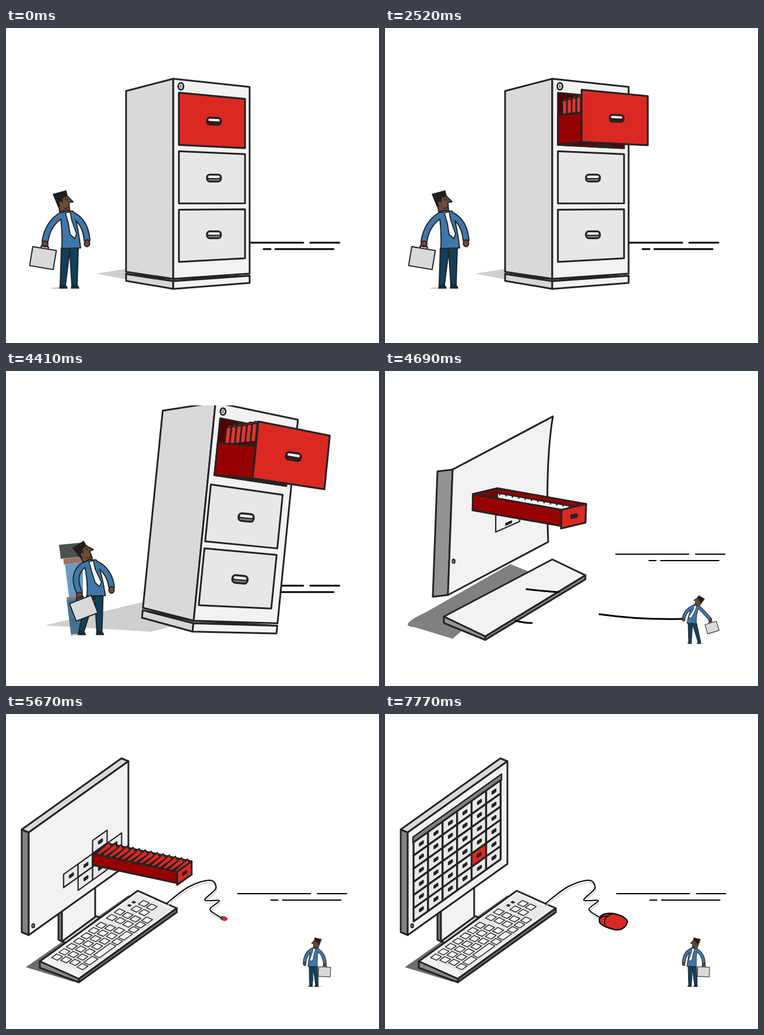
An HTML page for the animation above (7840 ms loop, 640 by 540 pixels).

```html
<!DOCTYPE html>
<html lang="en">
<head>
<meta charset="utf-8">
<title>Filing cabinet to computer</title>
<style>
html, body { margin: 0; width: 100%; height: 100%; overflow: hidden; background: #fff; }
svg { display: block; width: 100vw; height: 100vh; }
</style>
</head>
<body>
<svg id="stage" viewBox="0 0 640 540" stroke-linejoin="round" stroke-linecap="round"></svg>
<script>
const LOOP = 7840, STEP = 70;
const TIP = 3430, DROP = 4410, LAND = 4690, STILL = 5110;
const INK = '#242424', RED = '#dc2823', DEEP = '#960000', SKIN = '#6f4a37', BLUE = '#3f77aa', NAVY = '#10405c';
const stage = document.getElementById('stage');

const clamp = v => Math.max(0, Math.min(1, v));
const span = (t, a, b) => clamp((t - a) / (b - a));
const smooth = k => k * k * (3 - 2 * k);
const lerp = (a, b, k) => a + (b - a) * k;
const mix = (a, b, k) => a.map((v, i) => lerp(v, b[i], k));
const spring = (s, damp, freq) => s > 0 ? 1 - Math.exp(-damp * s) * Math.cos(freq * s) : 0;
const grey = v => `rgb(${[v, v, v].map(Math.round)})`;

function keyed(t, keys) {
  if (t <= keys[0][0]) return keys[0][1];
  for (let i = 1; i < keys.length; i++) {
    const [t0, a] = keys[i - 1], [t1, b] = keys[i];
    if (t < t1) return mix(a, b, smooth(span(t, t0, t1)));
  }
  return keys[keys.length - 1][1];
}

// ---------- geometry: points are [x, y], quads are four points in a flat list ----------
const add = (...pts) => pts.reduce(([x, y], [a, b]) => [x + a, y + b]);
const times = ([x, y], k) => [x * k, y * k];
const para = (o, a, b) => [...o, ...add(o, a), ...add(o, a, b), ...add(o, b)];
const shift = (q, dx, dy) => q.map((v, i) => v + (i % 2 ? dy : dx));
const corner = (q, i) => q.slice(i * 2, i * 2 + 2);
const inQuad = (q, u, v) =>
  mix(mix(corner(q, 0), corner(q, 1), u), mix(corner(q, 3), corner(q, 2), u), v);
const patch = (q, u0, v0, u1, v1) =>
  [[u0, v0], [u1, v0], [u1, v1], [u0, v1]].flatMap(([u, v]) => inQuad(q, u, v));
const centred = (q, u, v, w, h) => patch(q, u - w / 2, v - h / 2, u + w / 2, v + h / 2);

// ---------- drawing ----------
const path = (d, fill, w = 3, stroke = INK) =>
  `<path d="${d}" fill="${fill}" stroke="${w ? stroke : 'none'}" stroke-width="${w}"/>`;
const poly = (p, fill, w) => path('M' + p.map(v => v.toFixed(2)).join(' ') + 'Z', fill, w);
const group = (transform, body) => `<g transform="${transform}">${body}</g>`;
const oval = (x, y, rx, ry, fill, w = 0) =>
  `<ellipse cx="${x}" cy="${y}" rx="${rx}" ry="${ry}" fill="${fill}" stroke="${INK}" stroke-width="${w}"/>`;
const box = (x, y, w, h, r, fill, sw = 0) =>
  `<rect x="${x}" y="${y}" width="${w}" height="${h}" rx="${r}" fill="${fill}" stroke="${INK}" stroke-width="${sw}"/>`;

// Smooth curve through the given points.
function curve(pts) {
  const at = i => pts[Math.max(0, Math.min(pts.length - 1, i))];
  let d = 'M' + pts[0];
  for (let i = 0; i < pts.length - 1; i++) {
    const bow = (p, a, b) => add(p, times(add(b, times(a, -1)), 1 / 6));
    d += `C${bow(at(i), at(i - 1), at(i + 1))} ${bow(at(i + 1), at(i + 2), at(i))} ${at(i + 1)}`;
  }
  return d;
}

// ---------- man: lean, head turn, bag hand x, bag swing, step back ----------
const LOOK = [0, 0, 67, 9.5, 0];
const REST = [0, 2, 70, -3, 0];
const PEER = [-7, -12, 88, -10, 17];
const DODGE = [-3, -17, 82, -21, 12];
const PULL = [-7, -13, 48, 17, 12];

function man([lean, turn, hx, swing, step]) {
  const hy = Math.max(368, 371 + (hx - 69) * .4), ry = 369 + lean * .7;
  const leg = (x, f) => poly([x, 377, x + 15, 377, f + 4, 441, f - 5, 441], NAVY, 2) +
    path(`M${f - 6} 446L${f - 5} 441L${f + 3} 441Q${f + 6} 442 ${f + 7} 446Z`, '#132c3c', 1.6);
  const sleeves = `M${95 + lean} 321Q${(95 + lean + hx) / 2 - 9 - (hx - 67) * .75} ${hy / 2 + 150} ${hx} ${hy - 5}` +
    `M${115 + lean} 321Q${136 + lean / 2} 332 139 ${ry - 6}`;
  const face = poly([-11, -22, 4, -27, 15, -16, 8, -15, 9, -2, -8, 1], SKIN, 2) +
    poly([-19, -29, 3, -35, 5, -26, -3, -23, -4, -13, -10, -7], '#1e1e1e', 1.6) +
    oval(-6, -13, 2.6, 3.6, SKIN) + oval(5, -18, 1, 1, INK) + path('M1 -20L6 -21M0 -5Q4 -4 8 -7', 'none', 1.5);
  const bag = path('M-6 6V1H6V6', 'none', 2.5) + box(-20.5, 5, 41, 33, 0, '#d9d9d9', 2);
  const neck = 100 + lean;
  return oval(92 - step, 446, 15, 1.4, '#ccc') + leg(95, 98 - step) + leg(109, 118) +
    path(sleeves, 'none', 12) +
    path(`M${neck - 7} 319L${neck + 3} 313L${neck + 15} 314Q${123 + lean / 2} 335 128 377L96 378Q97 345 ${neck - 7} 319Z`, BLUE, 2) +
    path(sleeves, 'none', 8, BLUE) +
    path(`M${neck + 2} 317L${neck + 10} 315L${neck + 13} 330L121 353L118 361L110 354L${neck + 7} 335Z`, '#f7f7f7', 1.8) +
    group(`translate(${neck} ${314 - lean * .4}) rotate(${turn})`, face) +
    oval(hx, hy, 5, 5, SKIN, 2) + oval(139, ry, 4.6, 6, SKIN, 2) +
    group(`translate(${hx} ${hy + 3}) rotate(${swing})`, bag);
}

function smear(right) {
  const bands = [['#3c3c3c', 24], ['#8d6655', 10], ['#5a8fbd', 56], ['#8d6655', 4], ['#346788', 62]];
  let y = 296, out = '';
  for (const [fill, h] of bands) {
    const x = 91 + Math.min(13, (y - 296) * .3);
    out += poly([x, y + 2, right, y - 2, right, y + h - 2, x + h / 8, y + h + 2], fill, 0);
    y += h;
  }
  return `<g opacity=".9">${out}</g>`;
}

function drawMan(t) {
  const idle = mix(REST, LOOK, .45 + .55 * Math.cos(t / 2520 * 2 * Math.PI));
  const pose = t < 2520 ? idle
    : [...keyed(t, [[2520, LOOK], [3360, PEER], [4130, PEER], [DROP, DODGE], [LAND, PULL], [4900, PULL], [5180, REST]])];
  if (t > 5180) pose[1] += 1.5 * Math.sin((t - 5670) / 2100 * 2 * Math.PI);
  const [x, y, k] = keyed(t, [[3500, [109, 446, 1]], [4200, [112, 449, 1]], [DROP, [152, 452, .97]], [LAND, [527.5, 467, .5]]]);
  const flip = t >= LAND ? -1 : 1;
  return (t >= 4340 && t < 4550 ? smear(Math.min(x, 160) - 20) : '') +
    group(`translate(${x} ${y}) scale(${k * flip} ${k}) translate(-109 -446)`, man(pose));
}

// ---------- speed lines and cable ----------
function speedLines(t) {
  const [x, y, w] = keyed(t, [[DROP, [572, 368, 3]], [LAND, [583, 314, 2]], [STILL, [584.5, 308, 2]]]);
  return group(`translate(${x} ${y})`, path('M-187 0H-62M-50 0H0M-130 11H-118M-110 11H-10', 'none', w, '#000'));
}

function cable(t) {
  if (t < 4620) return '';
  if (t < 4760) return path('M243 374Q275 378 298 379M224 428Q238 432 252 432M368 417Q440 427 510 425', 'none', 3, '#000');
  const curl = [[275, 325], [314, 296], [350, 285], [360, 299], [341, 319], [366, 320], [350, 335], [369, 349]];
  const s = span(t, 4830, 5530), k = s < 1 ? spring(s, 5, 8) : 1;
  const d = curve(curl.map((p, i) => mix(mix(curl[0], [510, 425], i / 7), p, k)));
  let out = (s > .5 ? group('translate(1 4)', path(d, 'none', 1.5, '#ccc')) : '') + path(d, 'none', 2, '#000');
  if (t >= 5320) {
    const size = lerp(.25, 1, smooth(span(t, 5670, 6020)));
    out += group(`translate(368 349) scale(${size})`,
      path('M0 2C2 -6 11 -8 23 -7C35 -5 46 0 48 7C46 16 38 22 28 21C17 19 1 13 0 7Z', RED, 2.5, '#111') +
      path('M23 -7C12 -4 8 3 9 11M0 2Q6 -4 15 -2', 'none', 2, '#111'));
  }
  return out;
}

// ---------- keyboard keys ----------
function keys(t, top) {
  let out = poly(patch(top, .07, .07, .97, .93), '#e8e8e8', 0), n = 0;
  const key = (u, v, w = .052) => {
    const k = span(t, 4900 + n * 10, 5040 + n * 10);
    n++;
    if (k) out += poly(centred(top, u, v, w * k, .15 * k), '#f2f2f2', 1.4);
  };
  for (let r = 0; r < 3; r++) {
    const v = .18 + .2 * r;
    for (let c = 0; c < 7; c++) key(.105 + .075 * c + .012 * r, v);
    for (const u of r ? [.67, .745, .835, .912] : [.665, .745]) key(u, v);
  }
  let u = .087;
  for (const units of [1, 1.5, 2.7, 1, 1.5, 1, 1, 1]) {
    const w = units * .068;
    key(u + w / 2, .79, w - .016);
    u += w;
  }
  for (const u of [.84, .885]) out += poly(centred(top, u, .19, .016, .06), INK, 1);
  return out;
}

// ---------- screen cells ----------
const CW = 24.9, CH = 22.6, RISE = -.713 * CW;
const cellAt = (i, j) => [49 + CW * i, 220 + RISE * i + CH * j];
const cell = (i, j) => para(cellAt(i, j), [CW, RISE], [0, CH]);

// Cells spread from the red one, a little sooner towards the lower left.
function cells(t) {
  const bar = span(t, 6160, 6580);
  let out = bar ? poly(para([200, 103], [-152 * bar, 108 * bar], [0, 10]), '#808080', 2.4) : '';
  for (let j = 0; j < 6; j++) for (let i = 0; i < 6; i++) {
    const di = i - 4, dj = j - 4;
    if (!di && !dj) continue;
    const start = 3980 + 1210 * Math.sqrt(Math.abs(di) + Math.abs(dj) + (di - dj) / 4);
    const k = smooth(span(t, start, start + 210));
    if (!k) continue;
    const q = centred(cell(i, j), .5, .5, k, k);
    out += poly(q, '#e8e8e8', lerp(2.2, 3.3, bar)) + poly(centred(q, .54, .5, .24, .16), INK, 2.5);
  }
  return out;
}

// ---------- computer: edge vectors as it lands and at rest ----------
const LANDING = {
  screen: [116, 169], right: [172, -91], down: [-8, 215], depth: [-26, 3],
  board: [101, 421], long: [186, -98], wide: [71, 34], taper: [.2],
  slot: [151, 211], across: [42, -10], drop: [-1, 32], out: [152, 27], shade: [215, 331]
};
const RESTING = {
  screen: [39, 203], right: [171, -122], down: [0, 176], depth: [-12, -5],
  board: [58, 424], long: [168, -121], wide: [67, 30], taper: [0],
  slot: cellAt(4, 4), across: [CW, RISE], drop: [0, CH], out: [145, 31], shade: [210, 311]
};

function computer(settle) {
  const c = {};
  for (const name in RESTING) c[name] = mix(LANDING[name], RESTING[name], settle);
  const foot = add(c.screen, c.down), far = add(c.screen, c.right);
  const end = add(c.board, c.long), near = add(c.board, c.wide);
  const tip = add(end, times(c.wide, 1 - c.taper[0]));
  return Object.assign(c, {
    front: [...foot, ...c.screen, ...far, ...add(far, c.down)],
    side: [...add(foot, c.depth), ...foot, ...c.screen, ...add(c.screen, c.depth)],
    top: para(c.screen, times(c.depth, settle), c.right),
    keyTop: [...c.board, ...end, ...tip, ...near],
    keyLeft: [...c.board, ...near, ...add(near, [0, 6]), ...add(c.board, [0, 11])],
    keyRight: [...near, ...tip, ...add(tip, [0, 7]), ...add(near, [0, 6])]
  });
}

// ---------- cabinet ----------
const FRONT = [287, 87, 418, 101, 418, 421, 287, 430];
const SIDE = [206, 108, 287, 87, 287, 430, 206, 418];
const panel = (q, i) => patch(q, .074, .067 + .294 * i, .94, .329 + .294 * i);

// Lean about the front bottom corner while growing slightly.
function tipped(q, p) {
  const size = 1 + .096 * p, a = .1 * p, c = size * Math.cos(a), s = size * Math.sin(a);
  return [0, 1, 2, 3].flatMap(i => {
    const [x, y] = add(corner(q, i), [-287, -430]);
    return [287 + 35 * p + c * x - s * y, 430 - 2 * p + s * x + c * y];
  });
}

const handle = (x, y, turn, k, low) => group(`translate(${x} ${y}) rotate(${turn}) scale(${k})`,
  box(-12, -6, 24, 12, 5, low, 3) + box(-9.5, -4, 19, 4, 1.5, '#fff') + path('M-11 1H11', 'none', 2));

function shadow(top, right, low, left, round, fill) {
  const a = mix(left, low, .2 * round), b = mix(left, top, .2 * round);
  const bulge = add(left, [-14 * round, 3 * round]);
  return path(`M${top}L${right}L${low}L${a}Q${bulge} ${b}Z`, fill, 0);
}

function machine(t) {
  const p = span(t, TIP, DROP) ** 4;
  const fall = span(t, DROP, LAND), settle = smooth(span(t, LAND, STILL));
  const warp = fall * (1 - settle), pc = t > 4550;
  const comp = computer(settle);
  const cabFront = tipped(FRONT, p), cabSide = tipped(SIDE, p);
  const front = mix(cabFront, comp.front, fall), side = mix(cabSide, comp.side, fall);
  const tone = (a, b, c) => grey(lerp(lerp(a, b, fall), c, settle));

  const baseLeft = patch(cabSide, 0, 1.012, 1, 1.05), baseRight = patch(cabFront, 0, 1.012, 1, 1.05);
  const baseTop = [...corner(baseLeft, 0), ...corner(cabFront, 3), ...corner(baseRight, 1), ...corner(baseLeft, 1)];
  const keyTop = mix(baseTop, comp.keyTop, fall);
  const board = poly(keyTop, pc ? '#f2f2f2' : '#8c8c8c') + (t > 4900 ? keys(t, keyTop) : '') +
    poly(mix(baseLeft, comp.keyLeft, fall), tone(214, 150, 136)) +
    poly(mix(baseRight, comp.keyRight, fall), tone(242, 128, 112));

  let out = shadow(
    mix(add(corner(cabSide, 3), [0, -5 - 5 * p]), comp.shade, fall),
    mix(corner(cabFront, 3), add(comp.shade, [35, 14]), fall),
    mix([206 + 43 * p, 431 + 16 * p], [116, 459], fall),
    mix([155 - 88 * p, 421 + 15 * p], [34, 434], fall),
    warp, tone(207, 128, 108));
  if (!pc) out += board;
  if (t >= 4830) {
    const h = 60 * span(t, 4830, STILL);
    out += poly(para([96, 330 + h], [57, -44], [8, 3]), '#d9d9d9') +
      poly(para([90, 327], [6, 3], [0, h]), '#808080') +
      poly(para([96, 330], [57, -42], [0, h]), '#f2f2f2');
  }
  out += poly(side, tone(217, 146, 130));
  if (t >= LAND) out += poly(comp.top, '#d9d9d9');
  const bow = add(mix(corner(front, 2), corner(front, 3), .5), [-9 * warp, -30 * warp]);
  out += path(`M${corner(front, 0)}L${corner(front, 1)}L${corner(front, 2)}Q${bow} ${corner(front, 3)}Z`, '#f2f2f2');

  const [lx, ly] = inQuad(front, lerp(.1, .06, fall) + .19 * warp, lerp(.034, .045, fall));
  out += oval(lx, ly, lerp(4.5, 2.4, fall), lerp(5.8, 3.4, fall), '#e8e8e8', lerp(2.8, 1.8, fall)) +
    path(`M${lx} ${ly - 2}V${ly + 2}`, 'none', 1.4);

  if (t < LAND) for (const i of [1, 2]) {
    const q = centred(shift(panel(front, i), -5 * p, 4 * p), .5, .5, 1 - fall, 1 - fall);
    out += poly(q, '#e7e7e7') + handle(...inQuad(q, .53, .5), 5.5 * p, (1 + .09 * p) * (1 - fall), '#808080');
  } else out += cells(t);
  return out + drawer(t, p, fall, settle, comp, front) + (pc ? board : '');
}

// ---------- red drawer ----------
function hangingFiles(dx, p) {
  let out = '';
  for (let x = 288 + dx; x > 301; x -= 8) {
    const top = 125 - (x - 305) * .25, low = 151 - (x - 305) * .2;
    out += poly(tipped(para([x, top], [3, -4], [6, 0]), p), '#b01c18', 1.8) +
      poly(tipped([x, top, x + 7, top - 1, x + 7, low - 1, x, low], p), '#e8322d', 2);
  }
  return out;
}

function drawer(t, p, fall, settle, comp, front) {
  const open = spring((t - 1750) / 1000, 6, 9);
  const dx = 41 * open + 19 * p, dy = -5 * open + 4 * p;
  const d = 1 - smooth(span(t, 5740, 6440));
  const { slot, across, drop } = comp, reach = times(comp.out, d);
  const hole = panel(front, 0);
  const cabFace = tipped(shift(panel(FRONT, 0), dx, dy), p);
  const cabSide = [...inQuad(hole, 0, .43), ...inQuad(cabFace, 0, .43), ...corner(cabFace, 3), ...corner(hole, 3)];
  const face = mix(cabFace, para(add(slot, reach), across, drop), fall);
  const side = mix(cabSide, para(slot, reach, times(drop, .87)), fall);
  let out = '';

  if (open && t <= 4480) {
    out += poly(hole, '#560000');
    if (!fall) out += hangingFiles(dx, p) +
      poly([...corner(hole, 3), ...corner(cabFace, 3), ...corner(hole, 2)], '#6a0000');
  }
  if (t > 4480 && d > 0) {
    const full = t >= 4830;
    if (t >= LAND && settle < 1) {
      const below = mix(para([190, 248], [41, -18], [0, 28]), cell(4, 5), settle);
      out += poly(below, '#f2f2f2', 2.2) + poly(centred(below, .54, .8 - .3 * settle, .24, .1), INK, 2);
    }
    out += poly(para(slot, across, reach), full ? '#5a0000' : '#f2f2f2') +
      poly(para(slot, across, times(drop, .6)), '#7a0808') +
      poly(para(add(slot, across), reach, times(drop, .25)), full ? RED : DEEP, 2.5);
    const grow = span(t, 4830, 5180);
    for (let k = 13; k >= 0; k--) {
      const along = d - (k + .5) / 14;
      if (along < 0) continue;
      const a = add(slot, times(comp.out, along)), b = add(a, across);
      out += full
        ? poly([...a, ...add(b, [-2, -3 * grow]), ...add(b, [3, 5]), ...add(a, [5, 2])], RED, 2.2)
        : oval(...add(a, times(across, .45)), 1.3, 2.2, INK);
    }
  }
  if (open && d > 0) out += poly(side, DEEP);
  out += poly(face, RED, 3.2);
  return out + (t < 4550
    ? handle(...inQuad(face, .53, .5), 3 + 5.5 * p, lerp(1 + .09 * p, .4, fall), '#5a0a0a')
    : poly(centred(face, .52, .5, .24, .16), INK, 2.5));
}

function draw(t) {
  stage.innerHTML = '<defs><clipPath id="crop"><rect y="59" width="640" height="481"/></clipPath></defs>' +
    '<rect width="640" height="540" fill="#fff"/><g clip-path="url(#crop)">' +
    speedLines(t) + machine(t) + cable(t) + drawMan(t) + '</g>';
}

let last = -1;
function tick() {
  const t = Math.floor(performance.now() % LOOP / STEP) * STEP;
  if (t !== last) draw(last = t);
  requestAnimationFrame(tick);
}
tick();
</script>
</body>
</html>
```
